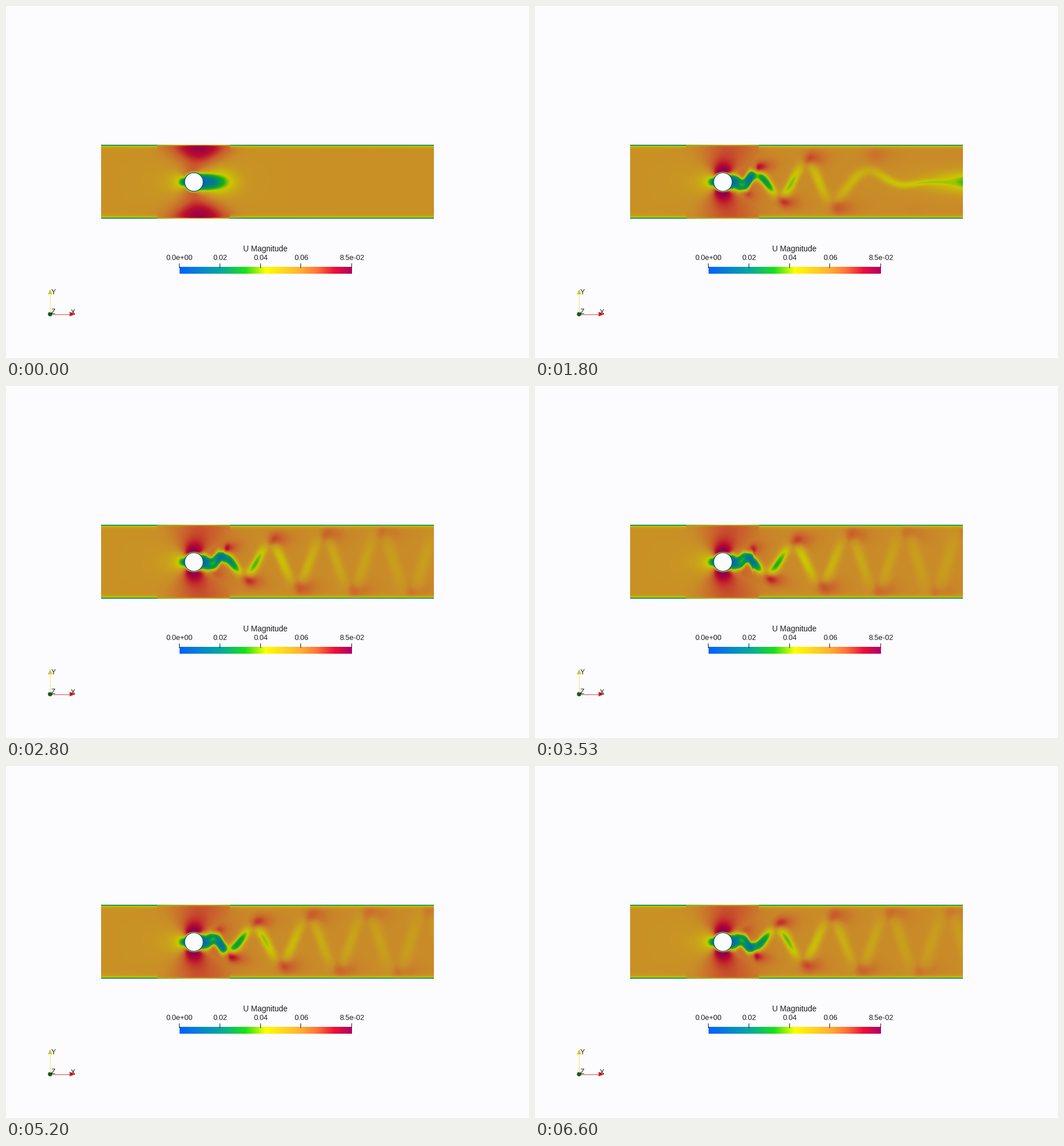
A matplotlib script that plays this animation: 913x614 px, repeating every 6.67 s.

```python
import numpy as np
import matplotlib.pyplot as plt
from matplotlib.animation import FuncAnimation
from matplotlib.colors import LinearSegmentedColormap
from matplotlib.patches import Circle, Polygon, Rectangle

W, H, DPI = 913, 614, 100
FRAMES, STEP = 100, 66.67
BG, INK = "#fcfcfe", "#1c1c1c"
X0, X1, Y0, Y1 = 166, 747, 242, 371      # channel
CX, CY, R = 328, 307, 16.5               # cylinder
BASE = 0.692                             # free stream, share of the range
PERIOD = 360                             # shedding period, ms

cmap = LinearSegmentedColormap.from_list("speed", [
    (0, "#0561ff"), (.235, "#05a8a2"), (.38, "#1ae01a"), (.5, "#ffff00"),
    (.7, "#ffb233"), (.8, "#ff7338"), (.9, "#ee1038"), (1, "#b20066")], N=512)

x = np.arange(X0, X1) + 0.5
y = np.arange(Y0, Y1)[:, None] + 0.5
dy = y - CY
gap = np.minimum(y - Y0, Y1 - y)


def gauss(d, s):
    return np.exp(-(d / s) ** 2)


def ramp(v, lo, hi):
    k = np.clip((v - lo) / (hi - lo), 0, 1)
    return k * k * (3 - 2 * k)


def mix(a, b, k):
    return a + (b - a) * k


def past(px):
    return np.maximum(x - px, 0)


def delay(px):
    """Travel time from the shedding point; the wake speeds up downstream."""
    d = px - 391
    far = (np.sqrt(90.5 ** 2 + 9.6 * np.maximum(d, 0)) - 90.5) / 4.8
    return PERIOD * np.where(d > 0, far, np.maximum(d / 46, -1))


def cycles(t):
    """Shedding cycles, slow until the wake becomes unstable."""
    return np.interp(t, [0, 1250, 1800, 2800, 6600, 7400],
                     [-4, -1.55, 0, 2.89, 13.42, 15.64])


# Ideal flow past the cylinder, mirrored in both walls
z = (x - CX) + 1j * dy
ideal = np.abs(1 - sum(256 / (z - 129j * k) ** 2 for k in (-1, 0, 1))) - 1
skin = 1 - np.exp(-np.clip(np.abs(z) - R + 0.6, 0, None) / 1.3)

# Wall layer, thinner where the mesh is refined
refined = (x > 264) & (x < 391)
wall = 1 - np.exp(-(gap + .2) / np.where(refined, .8, 2))

# Shape of the vortex street along the channel
late, late_axis = delay(x), delay(x + 10)
swing = 42 * (1 - np.exp(-past(345) / 130))
street_v = .15 + .5 * (1 - np.exp(-past(380) / 75))
street_w = 7.5 + 6 * np.exp(-past(345) / 25) + .02 * past(400)
hot = .19 * np.exp(-past(391) / 300) * ramp(x, 350, 390)
hot_y, hot_h = swing + 12, 6 + .3 * swing


def field(t):
    tr = t - late
    e = ramp(tr, 650, 1450)              # share of unsteady wake
    start = min(t / 200, 1)
    aged = min(t / 800, 1)
    blob_x = 372 + .24 * t

    # Outer flow
    lift = ideal / (1 + .5 * np.maximum(ideal, 0)) * mix(.3, 1, start)
    drag = ideal * mix(1, 1 - start, ramp(x, CX, CX + 12))
    v = BASE * (1 + np.where(ideal > 0, lift, drag))
    v = v + .012 * ramp(x, 335, 375) * ramp(blob_x - x, -20, 60)
    v = v + .05 * start * gauss(x - 358, 42)
    v = v + .09 * start * (1 - e) * gauss(x - 368, 24) * gauss(abs(dy) - 24, 13)

    # Starting blob and the fast flow beside it
    dx = x - blob_x
    v = v + mix(.26, .19, aged) * gauss(gap - 3, mix(27, 19, aged)) * gauss(
        x - 338 - .28 * t, mix(50 - .5 * gap, 52, aged))
    v = v - .22 * gauss(dx, 30 + .045 * t) * gauss(dy, 20)
    v = v - mix(.05, .23, aged) * gauss(dx, 16 + .032 * t) * gauss(
        dy, np.clip(12 - .09 * dx, 5, 15))

    # Fast spots outside each bend, steep upstream and trailing downstream
    for side in (-1, 1):
        q = 2 * np.pi * cycles(tr) + (np.pi if side > 0 else 0)
        lobe = np.exp(2.4 * (np.cos(q + .5 * (1 - np.cos(q))) - 1))
        v = v + hot * e * lobe * gauss(dy - side * hot_y, hot_h)

    # Slow wake along a swinging axis
    angle = 2 * np.pi * cycles(t - late_axis)
    axis = -swing * e * np.cos(angle)
    dist = (dy - axis) / np.sqrt(1 + np.gradient(axis) ** 2)
    xs = (x - 345) / mix(.3, 1, aged)
    calm_v = .14 + .33 * ramp(xs, 55, 160)
    calm_w = np.clip(15 - .075 * xs, 5, 15)
    beat = mix(1, np.sqrt(.06 + .94 * np.sin(angle) ** 2), ramp(x, 378, 392))
    force = mix(1 - ramp(dx, -40, 40), beat, e)
    power = mix(3, 2, ramp(x, 360, 410))
    m = np.exp(-np.abs(dist / mix(calm_w, street_w, e)) ** power)
    m = m * force * ramp(x, 328, 342)
    v = np.minimum(v, mix(v, mix(calm_v, street_v, e), m))

    # Return flow inside the bubble
    v = v + .32 * (1 - e) * ramp(t, 150, 700) * gauss(x - 369, 13) * gauss(dy, 4.5)
    v = v + .25 * e * gauss(x - 361, 7) * gauss(dist, 4.5)
    return np.clip(v * skin, 0, 1) * wall


def shade(v):
    return cmap(v)[..., :3] * .79


fig = plt.figure(figsize=(W / DPI, H / DPI), dpi=DPI, facecolor=BG)
ax = fig.add_axes([0, 0, 1, 1])
ax.axis("off")

flow = ax.imshow(shade(field(0)), extent=(X0, X1, Y1, Y0),
                 interpolation="nearest", aspect="auto")
ax.add_patch(Circle((CX, CY), 16, fc=BG, ec="#12606c", lw=.7))

# Colour bar
ax.imshow(np.linspace(0, 1, 301)[None, :], cmap=cmap, aspect="auto",
          extent=(303, 604, 467, 455), interpolation="nearest")


def label(px, py, s, size=12.7):
    ax.text(px, py, s, fontsize=size * 72 / DPI, color=INK, ha="center",
            va="center_baseline", family="Liberation Sans")


label(452.5, 422.5, "U Magnitude", 13.6)
for value, s in zip((0, .02, .04, .06, .085),
                    ("0.0e+00", "0.02", "0.04", "0.06", "8.5e-02")):
    px = 303 + 301 * value / .085
    label(px, 438.5, s)
    ax.add_patch(Rectangle((round(px) - 1, 449), 1, 8, fc=INK, lw=0))

# Orientation axes
ax.plot([77, 77], [534, 502], color="#ecec78", lw=.9)
ax.plot([80, 112], [537.5, 537.5], color="#c84848", lw=.7)
ax.add_patch(Polygon([(73, 503), (81, 503), (77, 494)], fc="#c8c83c", lw=0))
ax.add_patch(Polygon([(111, 533.5), (111, 541.5), (121, 537.5)], fc="#e81414", lw=0))
ax.add_patch(Circle((77, 537.5), 3.8, fc="#0a5c14", lw=0))
label(82.5, 498.5, "Y", 12)
label(82.5, 532.5, "Z", 12)
label(116.8, 533, "X", 12)

ax.set_xlim(0, W)
ax.set_ylim(H, 0)


def update(i):
    flow.set_data(shade(field(i * STEP)))
    return (flow,)


anim = FuncAnimation(fig, update, frames=FRAMES, interval=STEP,
                     repeat=True, repeat_delay=0, blit=False)
plt.show()
```
